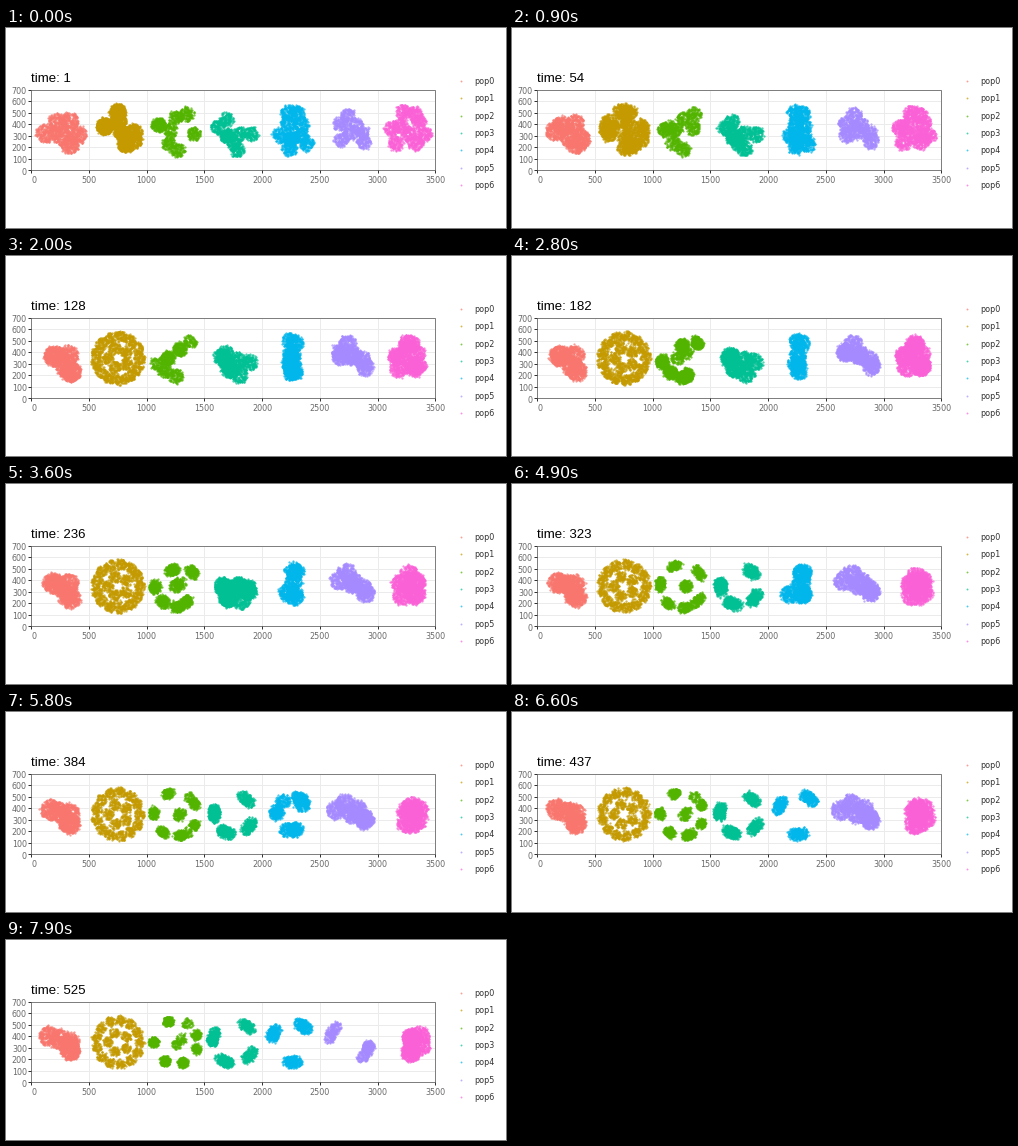
Recreate the animation shown at these times as a matplotlib script. Size 500x200 px, loop 8000 ms.

```python
import numpy as np
import matplotlib.pyplot as plt
from matplotlib.animation import FuncAnimation
from matplotlib.patches import Rectangle

FRAMES, STEP = 80, 100
COLORS = ("#F8766D", "#C49A00", "#53B400", "#00C094",
          "#00B6EB", "#A58AFF", "#FB61D7")
LEFT, RIGHT, BOTTOM = 25, 429.4, 142.4
SCALE = (RIGHT - LEFT) / 3500
TOP = BOTTOM - 700 * SCALE
HABITAT = 27


def px(n):
    return n * 0.72


def center(pop):
    return np.array([LEFT + (500 * pop + 250) * SCALE, BOTTOM - 350 * SCALE])


def lumps(r, *points):
    """Round patches of one radius, placed relative to the habitat centre."""
    return np.array([(x, y, r) for x, y in points], float)


def ring(degrees, dist, r, arc=0.0):
    """Patches spread evenly round the habitat, drawn out along the rim."""
    spread = (-arc, 0, arc) if arc else (0,)
    angles = [np.radians(d) + a for d in degrees for a in spread]
    return lumps(r, *((dist * np.cos(a), dist * np.sin(a)) for a in angles))


def mosaic(r):
    """Outer and inner ring of many small colonies."""
    return np.vstack([ring(np.arange(13) * 360 / 13, 22, r),
                      ring(np.arange(5) * 72 + 36, 10, r)])


# Each population passes through a few stages: (step, patches).
STAGES = (
    ((0, lumps(9, (-15, 3), (-3, -8), (9, -9), (2, 6), (10, 15), (18, 5))),
     (20, lumps(10, (-6, -2), (8, -3), (5, 8), (11, 14))),
     (79, lumps(10, (-11, -6), (0, -3), (9, 0), (10, 8)))),

    ((0, lumps(8, (0, -18), (0, -9), (-13, -4), (4, 3), (16, 2), (8, 14), (17, 11))),
     (18, mosaic(6.0)),
     (79, mosaic(4.8))),

    ((0, lumps(7, (0, -13), (11, -16), (-17, -5), (-5, 0), (18, 4), (-7, 13), (2, 20))),
     (20, lumps(7, (15, -17), (4, -9), (-8, 0), (-18, 6), (-10, 13), (0, 18))),
     (45, np.vstack([ring((250, 322, 185, 130, 83, 43), 22, 5, 0.15),
                     lumps(6, (4, 0))])),
     (79, np.vstack([ring((250, 302, 340, 18, 70, 119, 180), 22, 5),
                     lumps(5, (1, 2), (6, -3))]))),

    ((0, lumps(7, (-7, -11), (-16, -3), (-6, 6), (6, 4), (18, 4), (0, 13), (4, 20))),
     (34, lumps(9, (-9, 0), (4, 2), (14, 4), (-5, 11), (7, 15))),
     (47, ring((-50, 38, 110, 175), 19, 6, 0.2)),
     (79, ring((-51, 38, 117, 196), 21, 5.5, 0.2))),

    ((0, lumps(7.5, (-3, -18), (6, -17), (-3, -6), (10, -6), (-11, 5), (10, 5),
               (0, 9), (-2, 19), (16, 14))),
     (24, lumps(8, (-1, -17), (4, -15), (0, -4), (0, 6), (1, 14))),
     (49, lumps(9, (5, -13), (4, -2), (-8, 8), (5, 8))),
     (63, ring((-54, 87, 207), 20, 6, 0.2))),

    ((0, lumps(7, (-1, -15), (-9, -6), (7, -5), (14, 3), (1, 3), (-8, 10), (15, 12))),
     (28, lumps(9, (-2, -15), (-9, -6), (4, -3), (14, 2), (17, 8))),
     (66, lumps(9.5, (-14, -4), (-4, -10), (2, 0), (9, -5), (15, 5))),
     (79, ring((210, 30), 20, 5.5, 0.3))),

    ((0, lumps(7.5, (-3, -18), (8, -16), (12, -8), (-6, -4), (2, 4), (18, 4),
               (-15, -2), (-11, 13), (9, 13))),
     (28, lumps(9.5, (2, -13), (-8, -2), (8, -4), (-6, 9), (8, 8))),
     (79, lumps(9.5, (5, -4), (13, -6), (14, 4), (4, 10)))),
)


def morph(a, b, w):
    """Blend two sets of patches, each patch paired with its nearest one."""
    gap = np.hypot(*(a[:, None, :2] - b[None, :, :2]).transpose(2, 0, 1))
    pairs = {(k, int(m)) for k, m in enumerate(gap.argmin(axis=1))}
    pairs |= {(int(k), m) for m, k in enumerate(gap.argmin(axis=0))}
    return np.array([(1 - w) * a[k] + w * b[m] for k, m in sorted(pairs)])


def patches(pop, i):
    for (t0, a), (t1, b) in zip(STAGES[pop], STAGES[pop][1:]):
        if i <= t1:
            return morph(a, b, (i - t0) / (t1 - t0))
    return b


def individuals(pop, i):
    """A fresh generation scattered over the current patches."""
    rng = np.random.default_rng([i, pop])
    blobs = patches(pop, i)
    owner = blobs[np.repeat(np.arange(len(blobs)), (3 * blobs[:, 2] ** 2).astype(int))]
    dist = owner[:, 2] * np.sqrt(rng.random(len(owner)))
    angle = rng.uniform(0, 2 * np.pi, len(owner))
    pts = owner[:, :2] + np.column_stack([dist * np.cos(angle), dist * np.sin(angle)])
    pts += rng.normal(0, 0.6, pts.shape)
    return center(pop) + pts[np.hypot(*pts.T) < HABITAT]


fig = plt.figure(figsize=(5, 2), dpi=100, facecolor="white")
ax = fig.add_axes([0, 0, 1, 1])
ax.set(xlim=(0, 500), ylim=(200, 0))
ax.axis("off")


def line(xs, ys, color, z):
    ax.plot(xs, ys, color=color, lw=px(1), zorder=z, solid_capstyle="butt")


def label(x, y, text, size=8, color="#6A6A6A", **kw):
    kw = {"ha": "center", "va": "center_baseline", "family": "DejaVu Sans", **kw}
    return ax.text(x, y, text, fontsize=px(size), color=color, **kw)


for v in range(0, 3501, 500):
    x = LEFT + v * SCALE
    line((x, x), (TOP, BOTTOM), "#EBEBEB", 1)
    line((x, x), (BOTTOM, BOTTOM + 3), "#333333", 4)
    label(x if v else x + 2.5, 151.5, str(v))
for v in range(0, 701, 100):
    y = BOTTOM - v * SCALE
    line((LEFT, RIGHT), (y, y), "#EBEBEB", 1)
    line((LEFT - 3, LEFT), (y, y), "#333333", 4)
    label(21, y + 0.7, str(v), ha="right")
ax.add_patch(Rectangle((LEFT, TOP), RIGHT - LEFT, BOTTOM - TOP, fill=False,
                       ec="#7F7F7F", lw=px(1), zorder=3))

dots = []
for p, color in enumerate(COLORS):
    dots.append(ax.scatter([], [], s=px(2.3) ** 2, c=color, alpha=0.7, lw=0, zorder=2))
    y = 53.2 + 17.28 * p
    ax.scatter([455.2], [y], s=px(1.9) ** 2, c=color, alpha=0.7, lw=0)
    label(468.5, y + 3, f"pop{p}", color="#333333", ha="left", va="baseline")
title = label(LEFT, 54, "", 13.2, "black", ha="left", va="baseline",
              family="Liberation Sans")


def update(i):
    title.set_text(f"time: {max(1, int(1 + 6.72 * (i - 1)))}")
    for p, dot in enumerate(dots):
        dot.set_offsets(individuals(p, i))
    return [title, *dots]


anim = FuncAnimation(fig, update, frames=FRAMES, interval=STEP,
                     repeat=True, repeat_delay=0, blit=False)
plt.show()
```
